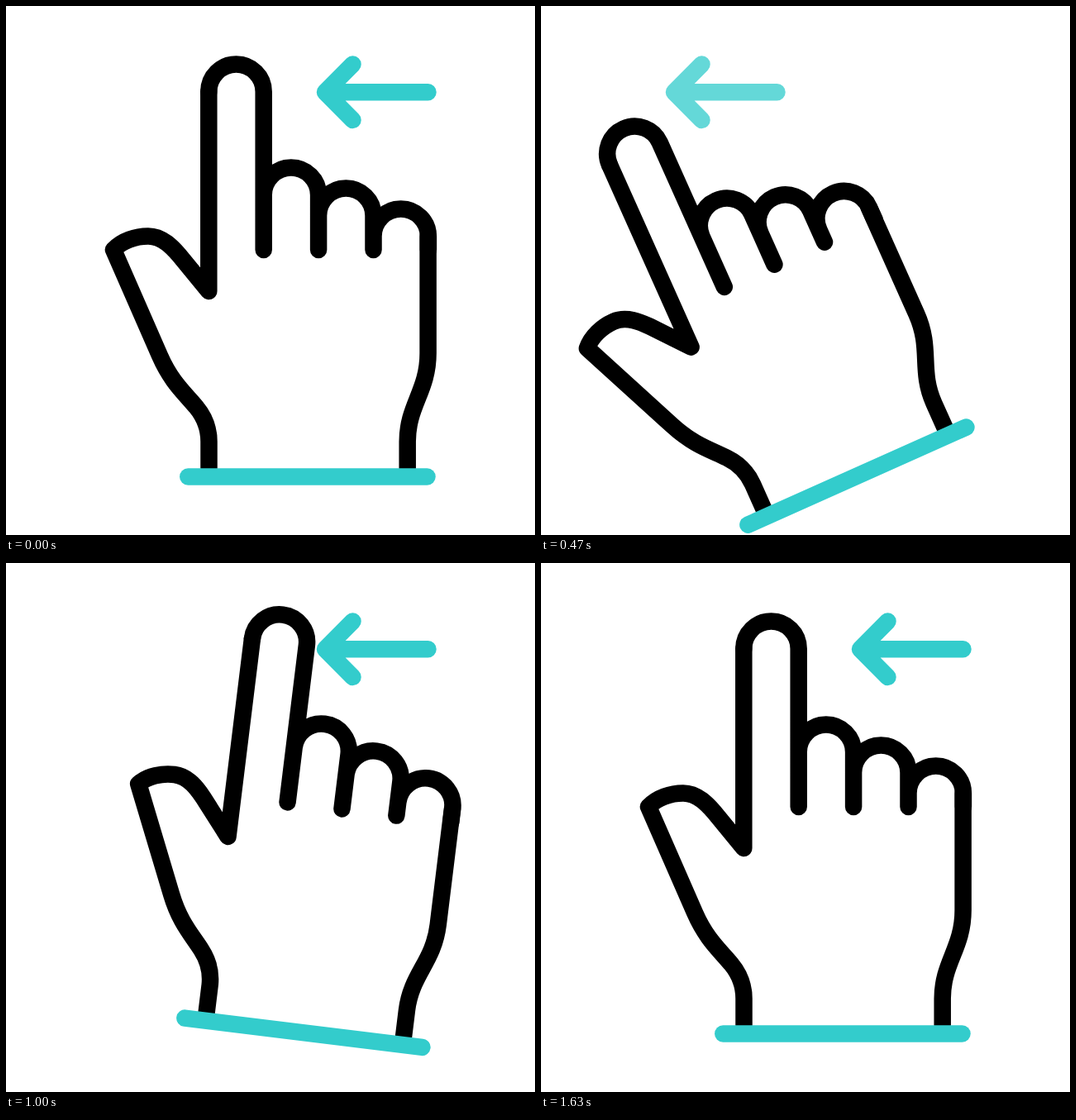
An HTML page for the animation above (1670 ms loop, 640 px wide and 640 px high).

```html
<!DOCTYPE html>
<html lang="en">
<head>
<meta charset="utf-8">
<title>Swipe left</title>
<style>
  html, body { margin: 0; height: 100%; overflow: hidden; background: #fff; }
  svg { display: block; width: 100%; height: 100%; }
  path { fill: none; stroke: #000; stroke-width: 20.5; stroke-linecap: round; stroke-linejoin: round; }
  .accent { stroke: #3cc; }
</style>
</head>
<body>
<svg viewBox="0 0 640 640">
  <g id="hand">
    <path d="M245.5 559V527C245.5 511 240 497 230 485C216 468 200 455 186 423L130 295
      C140 284 157 278.5 172 278.5C190 278.5 203 294 210 302L245.3 345V103.7"/>
    <path id="fingers"/>
    <path d="M510.6 278.7V420C510.6 466 485.7 483 485.7 527V559"/>
    <path class="accent" d="M220.3 569.4H509.5"/>
  </g>
  <path id="arrow" class="accent" d="M419.5 70.5L386 104.3L419.5 138M386 104.3H510.5"/>
</svg>
<script>
const LOOP = 1670, STEP = 100 / 3, LAST = 49;
const FINGER = 66.4, PIVOT = '371.8 528';
const [hand, fingers, arrow] = ['hand', 'fingers', 'arrow'].map(id => document.getElementById(id));

// Each finger is an arch with its right side; the folded ones step down evenly.
const arch = (i, top) => `M${245.3 + FINGER * i} ${top}a33.2 33.2 0 0 1 ${FINGER} 0V295`;
fingers.setAttribute('d', arch(0, 103.7) + [1, 2, 3].map(i => arch(i, 203.7 + 25 * i)).join(''));

// Progress from 0 to 1 between two steps, linear or eased.
const span = (step, from, to) => Math.min(1, Math.max(0, (step - from) / (to - from)));
function ease(step, from, to) {
  const u = span(step, from, to);
  return u * u * (3 - 2 * u);
}

// Wind up, swipe, swing back, swipe again, rest.
function handAngle(step) {
  return 7 * ease(step, 1, 6.2)
    - 31.1 * (ease(step, 6.2, 14) - ease(step, 14, 28))
    - 32.1 * ease(step, 30.1, 37.9)
    + 25.1 * ease(step, 37.9, 49);
}

// Leave to the left while fading, then come back in from the right.
function arrowPose(step) {
  const first = step < 28;
  const leave = first ? 8 : 32;
  const enter = first ? span(step, 16.5, 26.5) : span(step, 39.6, LAST);
  if (enter > 0) return { x: 84 * (1 - enter), opacity: enter };
  return {
    x: -225 * ease(step, leave, leave + 6),
    opacity: 1 - span(step, leave + 5.3, leave + 8.2)
  };
}

function draw(time) {
  const step = Math.min(LAST, Math.floor((time % LOOP + 4) / STEP));
  const { x, opacity } = arrowPose(step);
  hand.setAttribute('transform', `rotate(${handAngle(step)} ${PIVOT})`);
  arrow.setAttribute('transform', `translate(${x} 0)`);
  arrow.setAttribute('opacity', opacity);
}

const start = performance.now();
function tick() {
  draw(performance.now() - start);
  requestAnimationFrame(tick);
}
tick();
</script>
</body>
</html>
```
